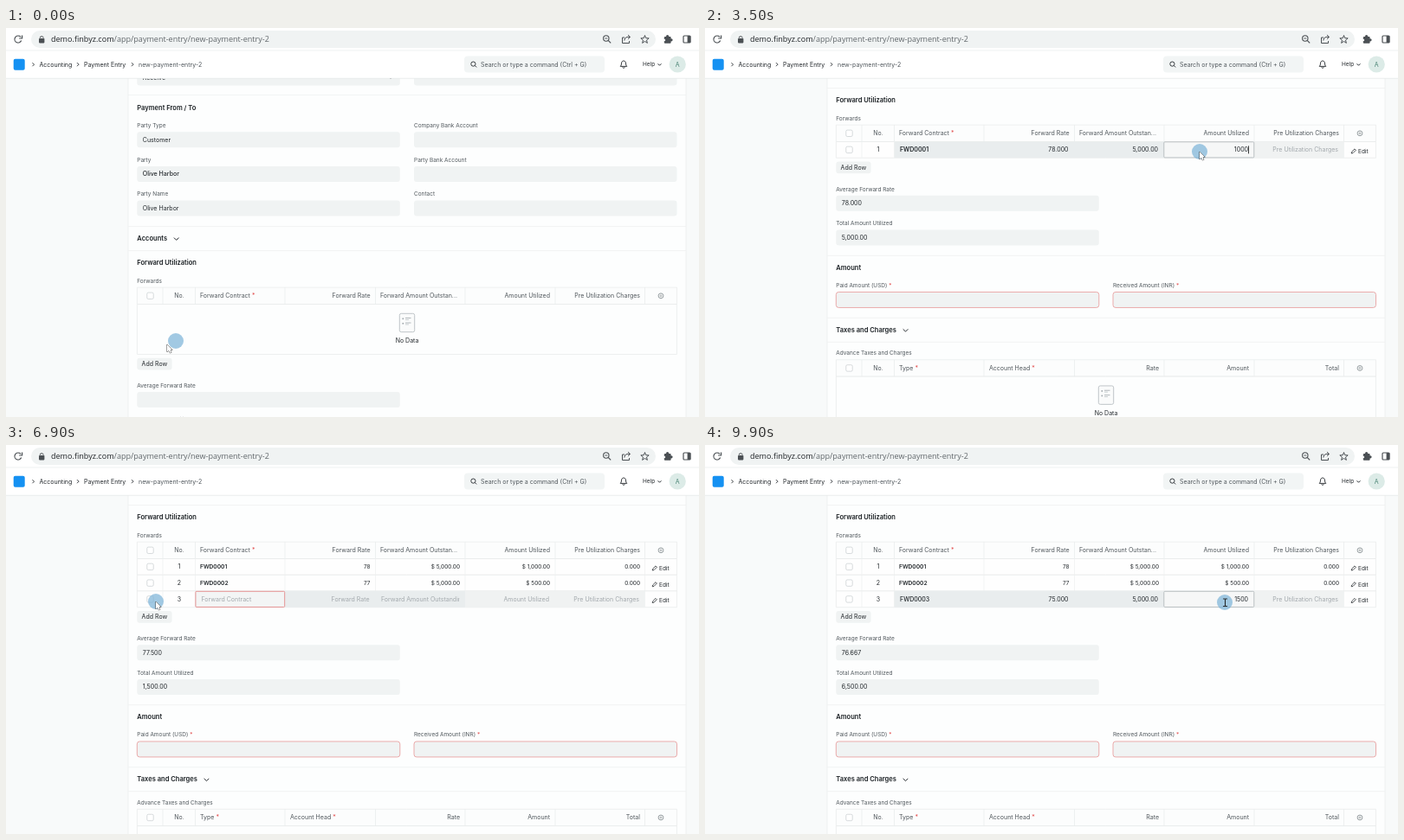
Recreate the animation shown at these times as an HTML page with a canvas. Size 800 px wide and 450 px high, loop 10000 ms.

```html
<!DOCTYPE html>
<html lang="en">
<head>
<meta charset="utf-8">
<title>Payment Entry</title>
<style>
html, body { margin: 0; width: 100%; height: 100%; overflow: hidden; background: #fff; }
canvas { display: block; width: 800px; height: 450px; }
</style>
</head>
<body>
<canvas id="stage"></canvas>
<script>
const cv = document.getElementById('stage');
const c = cv.getContext('2d');
const dpr = window.devicePixelRatio || 1;
cv.width = 800 * dpr;
cv.height = 450 * dpr;

const LOOP = 10000, STEP = 100;
const INK = '#24292d', SOFT = '#50575c', FAINT = '#a3a9ad', LINE = '#e7eaea', FIELD = '#f0f3f3', RED = '#e58a8a';
const MD = 7.02, SM = 6.48, LG = 7.55;
const ROW = 18.75;
const COLS = [181, 218.5, 322, 426.5, 530, 634, 737.5];
const ADDED = [500, 3900, 6900];

const rows = [
  { name: 'FWD0001', rate: 78, amount: '1000', used: '1,000.00', weight: 600,
    focus: 1000, open: 1300, pick: 1900, enter: 2600, type: 3100, blur: 3700 },
  { name: 'FWD0002', rate: 77, amount: '500', used: '500.00', weight: 500,
    focus: 4000, open: 4400, pick: 5100, enter: 5400, type: 5800, blur: 6400 },
  { name: 'FWD0003', rate: 75, amount: '1500', used: '1,500.00', weight: 500,
    focus: 7300, open: 7500, pick: 8500, enter: 8800, type: 9100, blur: 1e5 }
];
const totals = [
  [1900, '78.000', '5,000.00'], [3700, '78.000', '1,000.00'], [5100, '77.500', '6,000.00'],
  [6400, '77.500', '1,500.00'], [8500, '76.667', '6,500.00']
];
const path = [
  [-200, 212, 355, 'arrow'], [0, 186, 366, 'arrow'], [300, 173, 389, 'hand'], [600, 173, 389, 'arrow'],
  [1000, 262, 143, 'beam'], [1300, 262, 143, 'arrow'], [1500, 269, 172, 'hand'], [1900, 270, 172, 'arrow'],
  [2200, 275, 170, 'arrow'], [2600, 571, 143, 'beam'], [3500, 571, 143, 'arrow'], [3800, 173, 161, 'hand'],
  [4000, 254, 167, 'beam'], [4500, 254, 167, 'arrow'], [4800, 264, 222, 'hand'], [5100, 266, 222, 'arrow'],
  [5400, 583, 165, 'beam'], [5600, 585, 165, 'beam'], [6100, 585, 165, 'arrow'], [6600, 173, 181, 'hand'],
  [6900, 173, 181, 'arrow'], [7300, 278, 180, 'beam'], [7700, 279, 180, 'arrow'], [8200, 264, 275, 'hand'],
  [8500, 264, 275, 'arrow'], [8800, 598, 182, 'beam'], [9900, 600, 182, 'beam']
];

const ease = u => u * u * (3 - 2 * u);
const clamp = (v, a, b) => Math.max(a, Math.min(b, v));

function text(s, x, y, { size = MD, weight = 400, color = INK, align = 'left', font = 'Inter' } = {}) {
  c.font = `${weight} ${size}px ${font}, sans-serif`;
  c.textAlign = align;
  c.fillStyle = color;
  c.fillText(s, x, y + size * 0.36);
  return c.measureText(s).width;
}
function box(x, y, w, h, r, fill, stroke, lw = 0.7) {
  c.beginPath();
  c.roundRect(x, y, w, h, r);
  if (fill) { c.fillStyle = fill; c.fill(); }
  if (stroke) { c.strokeStyle = stroke; c.lineWidth = lw; c.stroke(); }
}
function rect(x, y, w, h, color) {
  c.fillStyle = color;
  c.fillRect(x, y, w, h);
}
function lines(pts, color = INK, lw = 1, close) {
  c.beginPath();
  pts.forEach(([x, y], i) => i ? c.lineTo(x, y) : c.moveTo(x, y));
  if (close) c.closePath();
  c.strokeStyle = color;
  c.lineWidth = lw;
  c.stroke();
}
function ring(x, y, r, color = INK, lw = 1, a = 0, b = 7) {
  c.beginPath();
  c.arc(x, y, r, a, Math.min(b, a + Math.PI * 2));
  c.strokeStyle = color;
  c.lineWidth = lw;
  c.stroke();
}
function disc(x, y, r, color) {
  c.beginPath();
  c.arc(x, y, r, 0, Math.PI * 2);
  c.fillStyle = color;
  c.fill();
}
const hline = (y, x = 141, w = 644, color = '#eff1f1') => rect(x, y - 0.4, w, 0.8, color);
const down = (x, y, r = 2.8) => lines([[x - r, y - r / 2], [x, y + r / 2], [x + r, y - r / 2]]);
const right = (x, y) => lines([[x - 1, y - 2], [x + 1, y], [x - 1, y + 2]], INK, 0.9);
const heading = (s, y) => text(s, 151.3, y, { size: LG, weight: 600, color: '#1b2024' });

function label(s, x, y, req) {
  const w = text(s, x, y, { size: SM, color: SOFT });
  if (req) text('*', x + w + 2, y, { size: SM, color: '#e24c4c' });
}
function field(s, x, y, opt = {}) {
  box(x, y - 9, 303.5, 18, 3, FIELD, opt.red && RED);
  if (s) text(s, x + 6.5, y, opt);
}
function check(y) {
  box(162.8, y - 3.7, 7.4, 7.4, 1.5, '#fff', '#bcc3c6', 0.6);
}
function gear(x, y) {
  ring(x, y, 2.9, '#8b9296', 0.9);
  ring(x, y, 1, '#8b9296', 0.7);
}
function tableHead(y, cells) {
  box(151.4, y - 9.7, 623, 19.4, 0, '#fcfdfd', LINE);
  COLS.forEach(x => rect(x - 0.35, y - 9.7, 0.7, 19.4, LINE));
  check(y);
  text('No.', 200, y, { color: SOFT, align: 'center' });
  cells.forEach(([s, x, align, req]) => {
    const w = text(s, x, y, { color: SOFT, align });
    if (req) text('*', x + w + 2, y, { color: '#e24c4c' });
  });
  gear(756, y);
}
function emptyBody(top, h) {
  box(151.4, top, 623, h, 0, '#fdfefe', LINE);
  const y = top + 21.5;
  box(454.3, y - 10.7, 17.4, 21.4, 2, '#fafbfb', '#b9c0c3', 0.9);
  [-5, 0.5].forEach(d => {
    rect(457.5, y + d - 0.5, 1.6, 1.6, '#9fa7ab');
    rect(461, y + d - 0.9, 6.5, 0.9, '#a9b0b4');
    rect(461, y + d + 1, 4, 0.9, '#c4cacc');
  });
  text('No Data', 463, top + 42, { align: 'center' });
}
function caret(x, y) {
  rect(x, y - 4.5, 0.9, 9, '#222');
}
function editMark(y) {
  lines([[746.2, y + 3.8], [746.7, y + 1.9], [750, y - 1.4], [751.4, y], [748.1, y + 3.3]], INK, 0.8, true);
  text('Edit', 754, y + 1.3, { size: SM });
}

function staticRow(r, y) {
  const opt = { size: SM, align: 'right' };
  text(r.name, 224, y, { size: 6.6, weight: 600 });
  text(String(r.rate), 420.5, y, opt);
  text('$ 5,000.00', 524, y, opt);
  text('$ ' + r.used, 628, y, opt);
  text('0.000', 732, y, opt);
}
function liveRow(r, y, t) {
  const top = y - ROW / 2, picked = t >= r.pick, blink = s => (t - s) % 1000 < 500;
  rect(218.5, top, 311.5, ROW, '#e9edee');
  rect(530, top, 207.5, ROW, '#f0f2f2');
  const pale = { color: FAINT }, paleR = { color: FAINT, align: 'right' }, val = { align: 'right' };
  if (picked) {
    text(r.name, 225, y, { weight: r.weight });
    text(r.rate + '.000', 419.5, y, val);
    text('5,000.00', 523, y, val);
  } else {
    box(218.9, top + 0.3, 102.8, ROW - 0.6, 1, '#f3f5f5', RED, 0.9);
    text('Forward Contract', 225.5, y, pale);
    if (t >= r.focus && blink(r.focus)) caret(225.2, y);
    text('Forward Rate', 419.5, y, paleR);
    c.save();
    c.beginPath();
    c.rect(430, top, 93.3, ROW);
    c.clip();
    text('Forward Amount Outstanding', 433, y, pale);
    c.restore();
  }
  text('Pre Utilization Charges', 731, y, paleR);
  if (!picked) text('Amount Utilized', 627, y, paleR);
  else if (t < r.enter) text('5,000.00', 627, y, val);
  else if (t >= r.blur) text(r.used, 627, y, val);
  else {
    box(529.8, top + 0.3, 104, ROW - 0.6, 1, '#f6f7f7', '#b4babd', 0.9);
    const n = Math.floor((t - r.type) / STEP) + 1;
    if (n <= 0) rect(608.8, y - 4.7, 18.4, 9.4, '#b9d3ec');
    text(n > 0 ? r.amount.slice(0, n) : '5000', 627, y, val);
    const last = r.type + (r.amount.length - 1) * STEP;
    if (n > 0 && blink(Math.min(t, last))) caret(627, y);
  }
}

function dropdown(top) {
  c.save();
  c.shadowColor = 'rgba(40,50,60,.22)';
  c.shadowBlur = 7 * dpr;
  c.shadowOffsetY = 2 * dpr;
  box(219, top + 0.4, 135, 162, 2, '#fff');
  c.restore();
  c.save();
  c.beginPath();
  c.rect(219, top, 135, 162);
  c.clip();
  box(222, top + 3, 126, 32, 3, '#f1f3f3');
  ['12309032023', '12309032024', '10032023'].forEach((code, i) => {
    const y = top + 13.4 + i * 34.7;
    text('FWD000' + (i + 1), 227, y, { weight: 700, color: '#15191c' });
    text('USD, 5000.0, FC' + code, 227, y + 11, { size: SM, color: '#3e454a' });
  });
  const bold = { weight: 600, color: SOFT };
  const w = text('Filters applied for ', 227, top + 117.7, { weight: 500, color: SOFT });
  text('Hedge =', 227 + w, top + 117.7, bold);
  ['Export, Status = Open,', 'Docstatus = 1, Amount', 'Outstanding > 0, Currency =', 'USD']
    .forEach((s, i) => text(s, 227, top + 128.2 + i * 10.5, bold));
  rect(350.4, top + 0.5, 3.2, 117.5, '#bfc3c4');
  c.restore();
}

function form(t) {
  const off = 188 * (1 - ease(clamp((t - 500) / 400, 0, 1)));
  const n = ADDED.filter(a => t >= a).length;
  rect(0, 58, 800, 392, '#f8fafa');
  rect(141, 58, 644, 392, '#fdfefe');
  rect(140.6, 58, 0.8, 392, '#eceeee');
  rect(784.6, 58, 0.8, 392, '#eceeee');

  c.save();
  c.translate(0, off - 188);
  field('Receive', 151.3, 57.5);
  down(444, 57.5, 2);
  field('', 471, 57.5);
  hline(77.5);
  heading('Payment From / To', 91.8);
  [['Party Type', 'Customer', 'Company Bank Account'], ['Party', 'Olive Harbor', 'Party Bank Account'],
   ['Party Name', 'Olive Harbor', 'Contact']].forEach(([a, v, b], i) => {
    const y = 112.7 + i * 39.7;
    label(a, 151.3, y);
    label(b, 471, y);
    field(v, 151.3, y + 16.5, { weight: i === 1 ? 500 : 400 });
    field('', 471, y + 16.5);
  });
  hline(229.7);
  heading('Accounts', 243.5);
  down(196.7, 244);
  hline(257.7);
  heading('Forward Utilization', 271.6);
  label('Forwards', 151.3, 292.2);
  tableHead(309.8, [['Forward Contract', 224, 'left', 1], ['Forward Rate', 420.5, 'right'],
    ['Forward Amount Outstan...', 432, 'left'], ['Amount Utilized', 628, 'right'],
    ['Pre Utilization Charges', 732, 'right']]);
  c.restore();

  const top = 131.5 + off;
  const end = top + (n ? n * ROW : 58);
  if (!n) emptyBody(top, 58);
  for (let i = 0; i < n; i++) {
    const y = top + (i + 0.5) * ROW;
    box(151.4, y - ROW / 2, 623, ROW, 0, '#fefefe', LINE);
    COLS.forEach(x => rect(x - 0.35, y - ROW / 2, 0.7, ROW, '#eef0f0'));
    check(y);
    text(String(i + 1), 200, y, { align: 'center' });
    if (i < n - 1) staticRow(rows[i], y);
    else liveRow(rows[i], y, t);
    editMark(y + 0.4);
  }

  const sum = totals.filter(s => t >= s[0]).pop() || [0, '', ''];
  c.save();
  c.translate(0, end);
  box(151.3, 4.2, 40.3, 13.8, 3, FIELD);
  text('Add Row', 171.4, 11, { align: 'center' });
  label('Average Forward Rate', 151.3, 36);
  field(sum[1], 151.3, 52.5);
  label('Total Amount Utilized', 151.3, 75.6);
  field(sum[2], 151.3, 92.2);
  hline(113);
  heading('Amount', 127);
  label('Paid Amount (USD)', 151.3, 147.4, 1);
  label('Received Amount (INR)', 471, 147.4, 1);
  field('', 151.3, 164.2, { red: 1 });
  field('', 471, 164.2, { red: 1 });
  hline(185);
  heading('Taxes and Charges', 199);
  down(231.5, 199.5);
  hline(213);
  label('Advance Taxes and Charges', 151.3, 225.6);
  tableHead(243.2, [['Type', 224, 'left', 1], ['Account Head', 328, 'left', 1], ['Rate', 524, 'right'],
    ['Amount', 628, 'right'], ['Total', 732, 'right']]);
  emptyBody(252.9, 58);
  c.restore();

  const live = rows[n - 1];
  if (live && t >= live.open && t < live.pick) dropdown(end);
}

function browserBar() {
  const g = '#4b5054';
  rect(0, 0, 800, 26, '#fff');
  ring(14, 13, 4, g, 1.2, 0.4, 5.6);
  lines([[18.6, 8.6], [18.6, 12], [15.2, 12]], g, 1.2);
  box(29, 3, 721, 20, 10, '#f0f3f3');
  box(38, 12, 6.4, 5.4, 0.8, g);
  ring(41.2, 11.6, 2, g, 1, Math.PI, Math.PI * 2);
  const url = { size: 9.05, font: '"Open Sans"' };
  const w = text('demo.finbyz.com', 52, 13, { ...url, color: '#202428' });
  text('/app/payment-entry/new-payment-entry-2', 52 + w, 13, { ...url, color: '#62686c' });
  ring(692.8, 12, 3.2, g, 1.1);
  lines([[695.2, 14.4], [698.2, 17.4]], g, 1.2);
  lines([[691.3, 12], [694.3, 12]], g, 0.9);
  lines([[714, 11], [711.5, 11], [711.5, 17.5], [719.5, 17.5], [719.5, 15]], g, 1);
  lines([[713.8, 14.5], [714.6, 11.8], [717, 10.4], [720, 10.4]], g, 1);
  lines([[718, 8], [720.6, 10.4], [718, 12.8]], g, 1);
  const star = Array.from({ length: 10 }, (_, i) => {
    const a = -Math.PI / 2 + i * Math.PI / 5, r = i % 2 ? 2.1 : 4.9;
    return [737.5 + r * Math.cos(a), 13.4 + r * Math.sin(a)];
  });
  lines(star, g, 1, true);
  box(759.8, 10, 7.8, 7.8, 1, g);
  disc(763.6, 9.6, 1.6, g);
  disc(768, 13.8, 1.6, g);
  disc(760, 14, 1.2, '#fff');
  box(782, 9, 8, 8, 1, null, g, 1.2);
  rect(786.6, 9, 3.6, 8, g);
}
function navBar() {
  rect(0, 26, 800, 32, '#fff');
  rect(0, 25.6, 800, 0.7, '#e9ecec');
  rect(0, 57.8, 800, 0.8, '#e6e9e9');
  box(8.7, 35.8, 13, 13, 2, '#1591f2');
  [31.5, 83, 146].forEach(x => right(x, 42.2));
  text('Accounting', 38.5, 42);
  text('Payment Entry', 90, 42);
  text('new-payment-entry-2', 153, 42, { color: SOFT });
  box(529, 32.5, 162, 19, 4, '#f2f5f5');
  ring(539.4, 41.6, 2.6, INK, 0.9);
  lines([[541.4, 43.6], [543.2, 45.4]], INK, 0.9);
  text('Search or type a command (Ctrl + G)', 548, 42, { color: SOFT });
  c.beginPath();
  c.moveTo(709.2, 44.4);
  c.quadraticCurveTo(710.5, 43.5, 710.5, 41);
  c.bezierCurveTo(710.5, 37, 715.5, 37, 715.5, 41);
  c.quadraticCurveTo(715.5, 43.5, 716.8, 44.4);
  c.closePath();
  c.strokeStyle = INK;
  c.lineWidth = 0.9;
  c.stroke();
  ring(713, 45, 1.3, INK, 0.9, 0.2, 2.9);
  text('Help', 735, 42, { size: SM });
  down(754.5, 42.3, 1.9);
  disc(775.2, 42, 9.6, '#dcebe7');
  text('A', 775.2, 42, { align: 'center', color: '#4d8577' });
}

function pointAt(t) {
  const i = Math.max(0, path.findLastIndex(k => k[0] <= t));
  const a = path[i], b = path[i + 1] || a;
  const u = b === a ? 0 : ease(clamp((t - a[0]) / (b[0] - a[0]), 0, 1));
  return [a[1] + (b[1] - a[1]) * u, a[2] + (b[2] - a[2]) * u, a[3]];
}
function pointer(t) {
  const [x, y, kind] = pointAt(t);
  const [hx, hy] = t < 100 ? [196, 362] : pointAt(t - 40);
  disc(hx, hy, 9, 'rgba(125,180,216,.72)');
  c.lineJoin = 'round';
  if (kind === 'beam') {
    lines([[x - 2, y - 4], [x + 3, y - 4]], '#222', 0.9);
    lines([[x - 2, y + 4.5], [x + 3, y + 4.5]], '#222', 0.9);
    lines([[x + 0.5, y - 4], [x + 0.5, y + 4.5]], '#222', 1);
  } else {
    const shape = kind === 'hand'
      ? [[-1, 0], [0.6, 0], [0.6, 3.5], [4.5, 4.5], [4.5, 8], [3.3, 10.5], [-1, 10.5], [-3.8, 6.5], [-2.8, 5.8], [-1, 7]]
      : [[0, 0], [0, 8.8], [2, 7], [3.4, 10], [4.9, 9.3], [3.5, 6.5], [6, 6.3]];
    lines(shape.map(([a, b]) => [x + a, y + b]), '#333', 0.9, true);
    c.fillStyle = '#fff';
    c.fill();
  }
  c.lineJoin = 'miter';
}

function draw(t) {
  c.setTransform(dpr, 0, 0, dpr, 0, 0);
  c.clearRect(0, 0, 800, 450);
  form(t);
  browserBar();
  navBar();
  pointer(t);
}
let start = null;
function tick(now) {
  if (start === null) start = now;
  const t = (now - start) % LOOP;
  draw(Math.floor(t / STEP) * STEP);
  requestAnimationFrame(tick);
}
requestAnimationFrame(tick);
</script>
</body>
</html>
```
